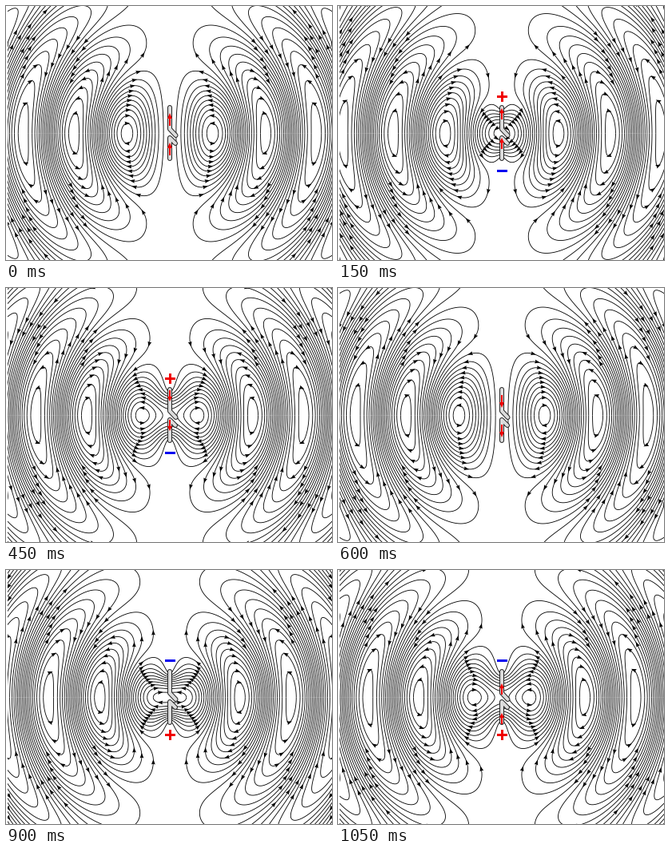
These frames come from a looping animation (408 by 318 pixels, 1.2 s). A matplotlib script:

```python
import numpy as np
import matplotlib.pyplot as plt
from matplotlib.animation import FuncAnimation
from matplotlib.collections import LineCollection, PolyCollection
from matplotlib.patches import Rectangle

W, H, DPI = 408, 318, 100
FRAMES, STEP = 8, 150
CX, CY = 205, 159.5
WAVE = 124                      # wavelength in pixels
HALF = WAVE / 4                 # half length of the radiating rod
K = 2 * np.pi / WAVE
LEVELS = np.arange(0.05, 1, 0.1)
RED, BLUE = "#f00000", "#0000f0"
PX = 72 / DPI

fig = plt.figure(figsize=(W / DPI, H / DPI), dpi=DPI, facecolor="white")
ax = fig.add_axes([0, 0, 1, 1])
ax.set_xlim(0, W)
ax.set_ylim(H, 0)
ax.axis("off")

lines = LineCollection([], colors="black", linewidths=0.85 * PX, zorder=1)
heads = PolyCollection([], facecolors="black", edgecolors="none", zorder=2)
ax.add_collection(lines)
ax.add_collection(heads)
ax.add_patch(Rectangle((0, 0), 1.5, H, color="white", lw=0, zorder=3))


def draw_rod(pts, width=6):
    x, y = np.array(pts).T
    for w, color in ((width, "#222222"), (width - 2, "#dcdcdc")):
        ax.plot(x, y, color=color, lw=w * PX, solid_capstyle="round",
                solid_joinstyle="round", zorder=4 + (w < width))


draw_rod([(205, 191), (205, 165), (212, 172)])
draw_rod([(205, 127), (205, 154), (212.5, 162)])


def sign_bars(y, color, plus):
    bars = [Rectangle((CX - 6.5, y - 1.5), 13, 3)]
    if plus:
        bars.append(Rectangle((CX - 1.5, y - 6.5), 3, 13))
    for bar in bars:
        bar.set(facecolor=color, edgecolor="none", zorder=6)
        ax.add_patch(bar)
    return bars


TOP, BOTTOM = 113.5, 206
top_plus = sign_bars(TOP, RED, True) + sign_bars(BOTTOM, BLUE, False)
top_minus = sign_bars(TOP, BLUE, False) + sign_bars(BOTTOM, RED, True)

current = PolyCollection([], facecolors=RED, edgecolors="none", zorder=7)
ax.add_collection(current)


def current_arrow(y, up, size):
    x = np.array([0, 3, 1, 1, -1, -1, -3])
    dy = np.array([-8, -1, -1, 8, 8, -1, -1]) * size
    return np.column_stack([CX + x, y + (dy if up else -dy)])


def half_line(level, lobe, phase):
    """Upper half of one field line, from its inner to its outer end."""
    centre = phase + lobe * np.pi
    reach = np.arccos(level)
    lo = max(-reach, np.pi / 2 - centre)
    if lo >= reach:
        return None
    mid, span = (reach + lo) / 2, (reach - lo) / 2
    theta = mid + span * np.sin(np.linspace(-np.pi / 2, np.pi / 2, 160))
    u = (centre + theta) / K
    v = np.arccos(np.clip(level / np.cos(theta), -1, 1)) / K
    rho = np.sqrt(np.maximum((u**2 - HALF**2) * (HALF**2 - v**2), 0)) / HALF
    return np.column_stack([rho, u * v / HALF])


def arrow_spots(pts, outward):
    """Positions and unit directions of the arrowheads on a half line."""
    dist = np.r_[0, np.cumsum(np.hypot(*np.diff(pts, axis=0).T))]
    total = dist[-1]
    n = 1 if total < 200 else 2 if total < 400 else 3
    for i in range(1, n + 1):
        s = total * i / (n + 1)
        a, p, b = (np.array([np.interp(d, dist, pts[:, j]) for j in (0, 1)])
                   for d in (s - 1, s, s + 1))
        t = (b - a) / max(np.hypot(*(b - a)), 1e-9)
        yield p, t if outward else -t


def arrow_head(p, t):
    n = np.array([-t[1], t[0]])
    return [p + 3.5 * t, p - 3 * t + 2.4 * n, p - 2.2 * t, p - 3 * t - 2.4 * n]


def field(phase):
    segs, tris = [], []
    for lobe in range(-2, 6):
        outward = lobe % 2 == 0
        for level in LEVELS:
            pts = half_line(level, lobe, phase)
            if pts is None:
                continue
            spots = list(arrow_spots(pts, outward))
            for sx in (-1, 1):
                for sy in (-1, 1):
                    segs.append(np.array([CX, CY]) + pts * [sx, sy])
                    for p, t in spots:
                        # the lower half runs the opposite way
                        d = t * [sx, sy] * (1 if sy < 0 else -1)
                        tris.append(arrow_head([CX, CY] + p * [sx, sy], d))
    return segs, tris


def update(i):
    segs, tris = field(2 * np.pi * i / FRAMES)
    lines.set_segments(segs)
    heads.set_verts(tris)

    for bar in top_plus:
        bar.set_visible(i in (1, 2, 3))
    for bar in top_minus:
        bar.set_visible(i in (5, 6, 7))

    if i % 4 == 2:
        current.set_verts([])
    else:
        step = (i + 1) % 4 - 1          # -1, 0, 1 through each half cycle
        up = i in (7, 0, 1)
        y = 142 + 7 * (-step if up else step)
        size = 1 if step == 0 else 0.88
        current.set_verts([current_arrow(y + d, up, size) for d in (0, 37)])
    return [lines, heads, current] + top_plus + top_minus


anim = FuncAnimation(fig, update, frames=FRAMES, interval=STEP,
                     init_func=lambda: update(0), repeat=True,
                     repeat_delay=0, blit=False)
plt.show()
```
